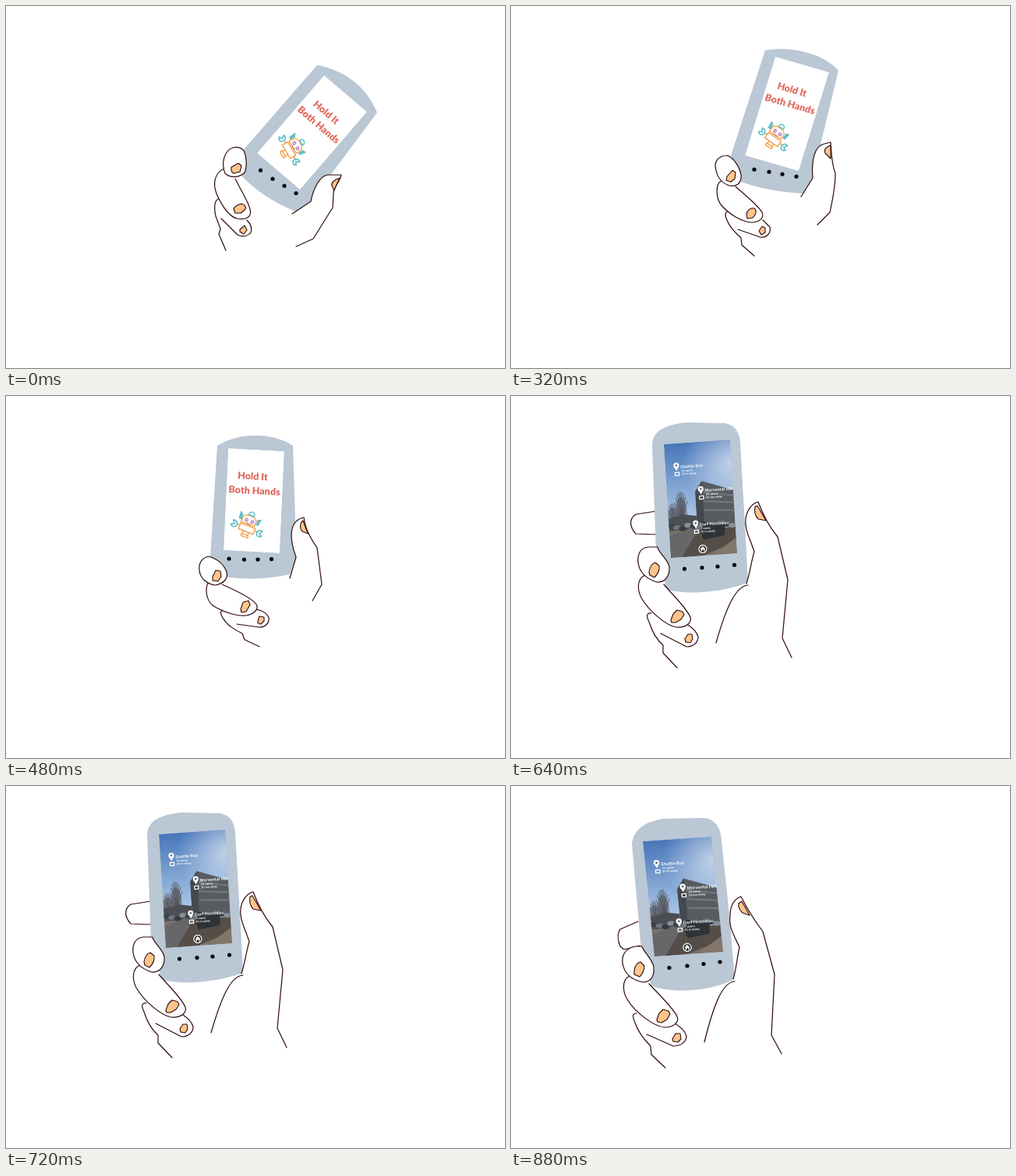
Write an HTML page with a canvas that moves like this. It is 640 by 465 pixels and loops after 0.96 s.

```html
<!DOCTYPE html>
<html lang="en">
<head>
<meta charset="utf-8">
<title>Phone in hand</title>
<style>
html, body { margin: 0; width: 100%; height: 100%; overflow: hidden; background: #fff; }
canvas { display: block; width: 640px; height: 465px; }
</style>
</head>
<body>
<canvas id="stage" width="640" height="465"></canvas>
<script>
const ctx = document.getElementById('stage').getContext('2d');
const LOOP = 960;
const INK = '#30090c', CASE = '#bac7d4', NAIL = '#fdc58c';
const CORAL = '#e06a5f', ORANGE = '#f3a04c', TEAL = '#62bfc8', PURPLE = '#a66bb5';

// screen: top left, top right and bottom left corners; fingers are drawn back to front
const poses = [
  {
    start: 0, view: splash,
    phone: 'M399 76C434 82 463 104 476 137L414 220L391 251L371 264C343 252 320 237 303 219L300 190Z',
    screen: [408, 89, 463, 136, 322, 189],
    dots: [326.5, 211, 342, 222, 357, 231, 372, 240.5],
    fingers: [
      'M367 267L391 251C394 235 402 219 412 217L430 217C428 226 420 233 420 240L419 259L394 299L372 309',
      'M274 247C266 249 267 262 269 270L275 286L273 293L282 314M276 273L297 294C303 297 310 296 314 291C316 285 313 279 309 275',
      'M283 208C265 213 266 231 270 241C277 258 288 272 297 273C308 275 316 271 313 261C311 252 302 238 294 222',
      'M281 215C276 203 279 186 291 182C298 180 303 183 305 186C309 194 309 208 306 214C300 220 289 222 281 215Z'
    ],
    nails: 'M428 221C421 223 417 227 418 231L421 237C423 230 426 225 428 221ZM289 207L298 202L302 205L300 213L292 215Q288 213 289 207ZM292 261C293 257 298 255 302 254C307 255 308 258 307 261L301 266L294 266ZM300 287L306 282L309 288L305 293L300 290Z'
  },
  {
    start: 240, view: splash,
    phone: 'M326 57C358 51 400 60 420 83L396 182L387 222L374 241C344 239 318 234 295 226L282 192Z',
    screen: [339, 65, 408, 85, 300, 192],
    dots: [312, 210, 331, 213, 348, 216, 366, 219],
    fingers: [
      'M372 245L387 221C385 200 389 179 402 177L410 175C411 190 411 202 416 215C416 235 412 250 409 265L393 281',
      'M280 263C274 264 274 269 277 275C281 286 290 293 295 298L296 307L312 321M291 287L320 297C328 298 334 291 332 284L323 275',
      'M269 225C262 230 263 246 269 255C280 268 296 277 308 278C319 278 325 272 322 265C318 258 301 243 288 232',
      'M278 192C264 192 260 202 263 211C265 221 271 228 281 231C291 232 296 226 295 217C293 206 286 196 278 192Z'
    ],
    nails: 'M410 179C404 181 401 184 403 189L410 196ZM277 219L284 211L288 214L287 222L282 226L276 224ZM302 267C304 261 307 259 312 260C316 263 314 268 310 272L303 273ZM318 289L322 283L326 285L326 291L321 294Z'
  },
  {
    start: 480, view: splash,
    phone: 'M271 64C300 46 343 47 368 64L371 160L372 207L364 229C335 236 305 236 280 232L262 207Z',
    screen: [285, 67, 357, 71, 279, 198],
    dots: [286, 209, 305.5, 210, 323, 210, 340.5, 209.5],
    fingers: [
      'M364 234L372 207C362 180 364 160 382 156C384 172 391 183 399 195L405 242L393 263',
      'M279 275C274 276 275 280 278 285C284 295 293 300 303 305L306 313L325 322M296 293L325 297C333 297 338 291 337 285C335 279 330 276 321 274',
      'M259 240C255 249 257 262 265 269C279 278 297 283 308 282C318 280 323 275 322 269C318 261 300 252 277 242',
      'M260 206C250 208 247 216 248 224C249 234 257 241 268 243C280 241 285 234 283 226C279 215 270 209 260 206Z'
    ],
    nails: 'M381 160C376 164 377 171 380 174L388 177C384 171 383 165 381 160ZM265 232L269 224L275 225L276 232L272 238L265 237ZM301 274L304 265L311 263L313 268L308 277L302 278ZM323 289L325 283L331 284L331 289L327 293L323 292Z'
  },
  {
    start: 560, view: sunnyPhoto,
    back: 'M236 154L221 155C212 158 210 166 215 172L236 176',
    phone: 'M237 56C265 36 312 37 338 53L345 160L348 200L341 225C310 233 280 235 254 232L235 207Z',
    screen: [249, 65, 328, 63, 252, 196],
    dots: [263, 209, 279, 209, 297, 209, 315, 209],
    fingers: [
      'M341 228L349 200C338 175 337 155 357 148C362 165 369 175 376 185C380 203 383 222 385 236L374 258M340 227C326 243 318 260 328 271',
      'M255 277C250 278 253 283 257 289C263 298 273 303 282 307L285 314L306 323M274 295L305 297C313 296 317 291 316 284C313 279 307 275 299 274',
      'M234 240C231 250 235 261 243 268C255 277 275 283 286 282C297 281 301 275 300 269C296 260 276 251 254 242',
      'M232 206C223 207 220 215 221 223C223 233 232 240 243 243C255 241 259 235 257 227C252 216 243 208 232 206Z'
    ],
    nails: 'M356 152C352 154 352 160 354 164L364 167C360 161 358 157 356 152ZM238 232L242 224L248 223L250 230L246 238L239 239ZM278 274L282 264L289 262L291 267L286 277L280 278ZM302 288L304 282L310 283L310 289L306 293L302 291Z'
  },
  {
    start: 640, view: labelledPhoto,
    back: 'M186 148L160 152C151 158 152 168 160 177L188 178',
    phone: 'M181 62C182 45 197 37 225 34L275 35C288 38 293 47 294 60L300 165L304 240C270 252 230 256 200 249L186 200Z',
    screen: [196, 62, 281, 56, 205, 208],
    dots: [222.5, 222, 245, 220.5, 265, 219, 286.5, 217],
    fingers: [
      'M302 241C307 225 308 213 312 200C306 182 299 170 301 157C303 146 309 138 317 136C324 155 333 170 342 181L355 236L348 311L360 336M304 243C288 244 276 272 263 317',
      'M180 279C173 278 174 284 177 290C181 303 188 314 195 320L195 330L213 349M192 305L225 322C234 322 240 317 240 309C238 303 233 298 227 294',
      'M172 230C161 235 162 249 167 259C178 278 200 295 212 297C225 298 232 291 230 284C225 272 206 254 196 242',
      'M176 194C165 195 162 205 163 214C165 228 174 235 187 239C199 240 204 229 203 219C201 209 188 200 188 194Z'
    ],
    nails: 'M313 142L316 141L327 160L317 158C313 154 312 148 313 142ZM177 226C178 220 181 215 185 214L190 218C191 224 187 230 184 233L178 230ZM205 288L208 280L213 275L220 277L222 281L218 287L211 291L206 291ZM223 312L227 306L232 306L233 312L230 317L224 316Z'
  },
  {
    start: 800, view: labelledPhoto,
    back: 'M163 174L140 184C136 190 137 199 140 206L145 210L166 205',
    phone: 'M155 74C158 55 172 46 196 42L248 41C262 43 269 53 270 70L280 165L287 248C255 264 210 267 180 257L167 210Z',
    screen: [169, 71, 257, 65, 184, 219],
    dots: [203, 233.5, 226, 231, 247, 228.5, 268, 226],
    fingers: [
      'M285 248C289 235 290 220 293 207C285 190 279 180 281 167C281 152 287 145 295 142C303 158 314 175 323 187L338 242L334 320L347 344M287 251C271 252 260 281 248 329',
      'M161 292C155 292 156 297 159 304C163 316 172 327 179 334L180 345L198 362M174 319L208 334C219 334 225 328 225 321C223 315 217 309 210 305',
      'M152 244C142 249 143 264 149 274C160 292 184 309 197 310C209 310 216 303 213 296C208 285 188 266 177 254',
      'M159 206C146 209 142 218 143 227C145 241 155 249 169 252C181 252 184 242 183 232C181 222 170 213 168 206Z'
    ],
    nails: 'M292 151L296 148L306 166L297 163C293 159 291 155 292 151ZM158 237C159 231 162 227 166 226L171 231C171 237 168 242 165 245L158 242ZM187 300L190 292L195 287L202 289L204 293L200 300L193 304L188 303ZM207 325L211 318L217 318L218 325L214 329L208 328Z'
  }
];

function shape(d, fill, stroke, width = 1.2) {
  const path = new Path2D(d);
  if (fill) { ctx.fillStyle = fill; ctx.fill(path); }
  if (stroke) { ctx.strokeStyle = stroke; ctx.lineWidth = width; ctx.stroke(path); }
}

function disc(x, y, r, fill) {
  ctx.fillStyle = fill;
  ctx.beginPath();
  ctx.arc(x, y, r, 0, Math.PI * 2);
  ctx.fill();
}

function text(str, x, y, font, fill, align) {
  ctx.font = font;
  ctx.fillStyle = fill;
  ctx.textAlign = align;
  ctx.textBaseline = 'middle';
  ctx.fillText(str, x, y);
}

// Draws a w by h view into the parallelogram of the screen.
function onScreen([x, y, rx, ry, bx, by], w, h, draw) {
  ctx.save();
  ctx.transform((rx - x) / w, (ry - y) / w, (bx - x) / h, (by - y) / h, x, y);
  ctx.beginPath();
  ctx.rect(0, 0, w, h);
  ctx.clip();
  draw();
  ctx.restore();
}

function splash(screen) {
  onScreen(screen, 72, 132, () => {
    ctx.fillStyle = '#fff';
    ctx.fillRect(0, 0, 72, 132);
    text('Hold It', 33, 35, '900 12.5px Lato, sans-serif', CORAL, 'center');
    text('Both Hands', 36, 53.5, '900 12.5px Lato, sans-serif', CORAL, 'center');
    robot();
  });
}

function robot() {
  ctx.save();
  ctx.translate(28.5, 102.5);
  ctx.rotate(0.33);
  shape('M-11 -15L-15 -18L-14 -9L-10 -9M9 -15L13 -17L12 -9L9 -9', TEAL, TEAL, 1);
  shape('M-10 -6L-10 -12C-9 -19 7 -19 8 -12L8 -6Z', '#fff', ORANGE, 1.4);
  shape('M-4 -18C-5 -24 4 -24 3 -18Z', '#fff', TEAL, 1.5);
  shape('M-10 -4L10 -4L10 4L-10 4ZM-14 -1L-10 -1M10 -1L14 -1M-3 4L-3 8M4 4L4 8M-4 8L5 8L5 11L-4 11Z', '#fff', ORANGE, 1.4);
  shape('M-20 -4C-15 -6 -12 0 -15 3C-17 5 -20 4 -21 2L-17 0Z', '#fff', TEAL, 1.7);
  shape('M20 -4C15 -6 12 0 15 3C17 5 20 4 21 2L17 0Z', '#fff', TEAL, 1.7);
  shape('M-6 -12h3v3h-3ZM2 -12h3v3h-3Z', null, PURPLE, 1.1);
  shape('M-3 -7Q-1 -5 2 -7', null, CORAL, 1);
  ctx.restore();
}

function sky(top, low) {
  const g = ctx.createLinearGradient(0, 0, 0, 105);
  g.addColorStop(0, top);
  g.addColorStop(1, low);
  ctx.fillStyle = g;
  ctx.fillRect(0, 0, 84, 145);
}

function glow(x, y, r, strength) {
  const g = ctx.createRadialGradient(x, y, 0, x, y, r);
  g.addColorStop(0, `rgba(255,255,255,${strength})`);
  g.addColorStop(1, 'rgba(255,255,255,0)');
  ctx.fillStyle = g;
  ctx.fillRect(0, 0, 84, 145);
}

function tree(x, base, height) {
  ctx.fillStyle = 'rgba(70,66,68,.45)';
  ctx.beginPath();
  ctx.ellipse(x, base - height * 0.45, 7, height * 0.4, 0, 0, Math.PI * 2);
  ctx.fill();
  ctx.strokeStyle = '#4b4849';
  ctx.lineWidth = 0.7;
  ctx.beginPath();
  for (let i = -4; i <= 4; i++) {
    ctx.moveTo(x, base);
    ctx.quadraticCurveTo(x + i * 0.8, base - height * 0.5, x + i * 2, base - height + i * i * 0.8);
  }
  ctx.stroke();
}

function cars(y, from, to, tones) {
  for (let i = 0, x = from; x < to; i++, x += 7) {
    ctx.fillStyle = tones[i % tones.length];
    ctx.beginPath();
    ctx.ellipse(x, y + (i % 3) * 2, 4.5, 3, 0, 0, Math.PI * 2);
    ctx.fill();
  }
}

function sunnyPhoto(screen) {
  onScreen(screen, 84, 145, () => {
    sky('#5479bd', '#bcd6f2');
    glow(67, 46, 55, 0.9);
    glow(67, 30, 18, 0.8);
    glow(67, 52, 18, 0.9);
    tree(12, 103, 40);
    tree(80, 103, 28);
    shape('M0 88L25 84L84 88V112H0Z', '#55585d');
    shape('M25 64L33 51L67 62V102H25Z', '#50565a');
    shape('M28 66L66 70M28 75L66 79M28 84L66 88', null, '#777d80', 1.5);
    shape('M0 111H84V145H0Z', '#857a72');
    shape('M0 119L30 110L38 112L14 145H0Z', '#786e68');
    shape('M42 114L72 112L62 126L42 145H26Z', '#62584e');
    shape('M60 145L84 124V145Z', '#94877a');
    cars(105, 4, 84, ['#5d6572', '#d3d9e1', '#4b5059', '#b3bcc8']);
    shape('M36 114L42 109L52 111L48 122L37 121Z', '#4a4a47');
  });
}

function pin(x, y, title, lines) {
  disc(x, y - 2, 3.5, '#fff');
  shape(`M${x - 3.3} ${y - 1}L${x} ${y + 5}L${x + 3.3} ${y - 1}Z`, '#fff');
  disc(x, y - 2, 1.3, '#53647d');
  shape(`M${x - 2} ${y + 7}h5v4h-5Z`, null, '#fff', 1.2);
  text(title, x + 5, y + 0.5, '600 5.2px Inter, sans-serif', '#fff', 'left');
  lines.forEach((line, i) =>
    text(line, x + 6, y + 5.5 + i * 4, '600 3.6px Inter, sans-serif', '#fff', 'left'));
}

function labelledPhoto(screen) {
  onScreen(screen, 84, 145, () => {
    sky('#4776b9', '#b5cfeb');
    glow(84, 28, 62, 0.6);
    tree(17, 108, 46);
    tree(6, 108, 32);
    shape('M0 95L20 91L36 94V114H0Z', '#4b4e52');
    shape('M36 63L45 50L84 64V110H36Z', '#575c61');
    shape('M36 63L45 50V106H36Z', '#44494e');
    shape('M47 65L84 71M47 76L84 80M47 87L84 90', null, '#74797d', 2);
    shape('M0 111H84V145H0Z', '#797169');
    shape('M0 117L29 108L40 111L25 145H0Z', '#67676a');
    shape('M34 116L84 110V130L40 145H14Z', '#554e48');
    shape('M53 145L84 125V145Z', '#82766a');
    cars(105, 3, 84, ['#3d4247', '#6b747f', '#373b40', '#858f9a']);
    shape('M39 113C42 104 66 101 71 110L70 121L43 125Z', '#303336');
    pin(14, 30, 'Shuttle Bus', ['14 users', '20 m away']);
    pin(43, 62, 'Morvental Hbf', ['24 users', '20 km away']);
    pin(34, 105, 'Dorf Himmelau', ['7 users', '10 m away']);
    disc(41, 136.5, 5.5, '#fff');
    disc(41, 136.5, 4.3, '#17191b');
    shape('M37.5 136.5L41 133L44.5 136.5H43.5V139.5H42V137.5H40V139.5H38.5V136.5Z', '#fff');
  });
}

function draw(pose) {
  ctx.fillStyle = '#fff';
  ctx.fillRect(0, 0, 640, 465);
  if (pose.back) shape(pose.back, '#fff', INK);
  shape(pose.phone, CASE);
  pose.view(pose.screen);
  for (let i = 0; i < pose.dots.length; i += 2) disc(pose.dots[i], pose.dots[i + 1], 2.6, '#000');
  pose.fingers.forEach(d => shape(d, '#fff', INK));
  shape(pose.nails, NAIL, INK, 1.1);
}

ctx.lineJoin = ctx.lineCap = 'round';

function tick() {
  const time = performance.now() % LOOP;
  draw(poses.findLast(pose => pose.start <= time));
  requestAnimationFrame(tick);
}
tick();
</script>
</body>
</html>
```
